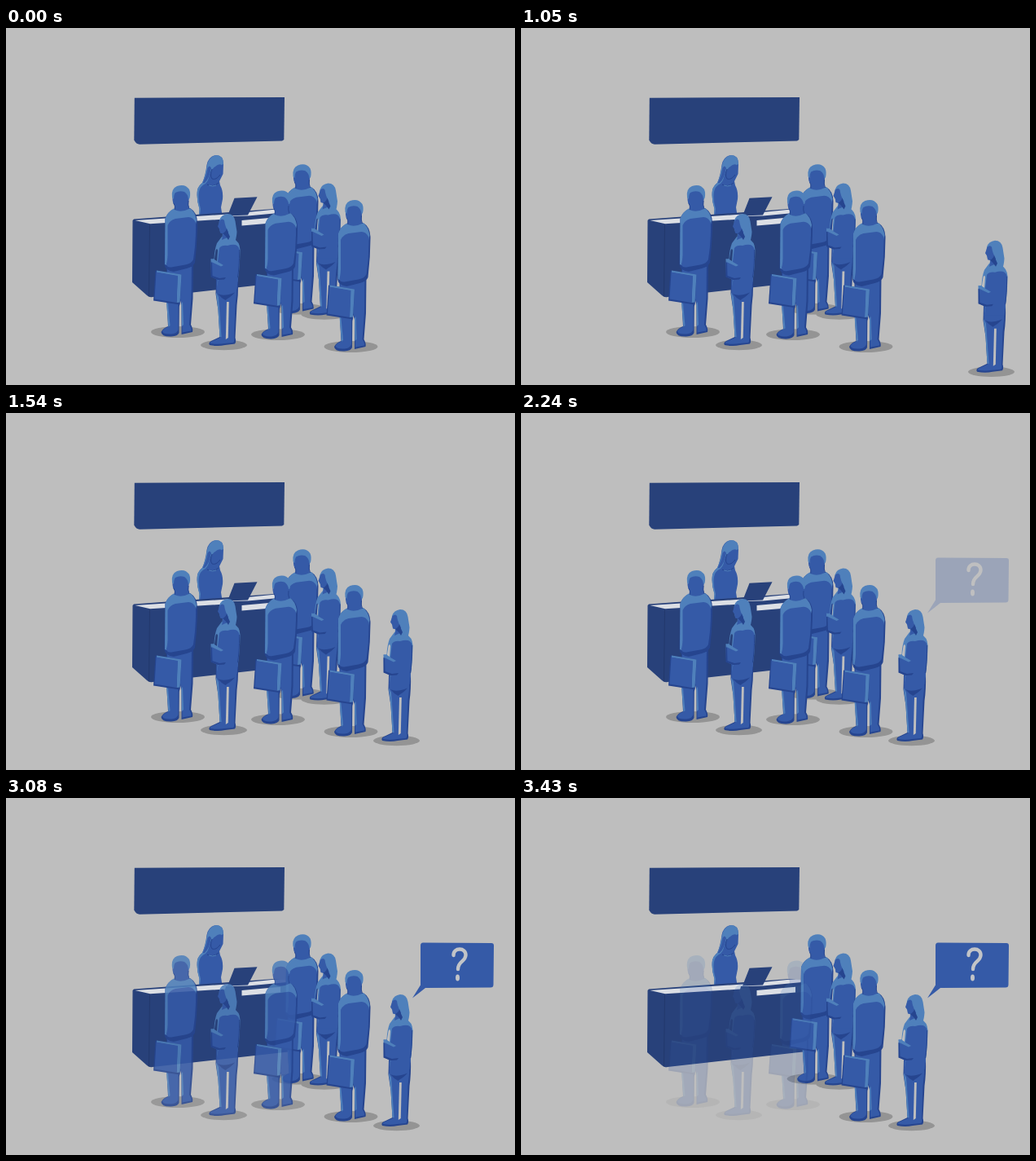
Animation, 625 px wide and 438 px high, one loop 6.72 s. Source, as an HTML page:

```html
<!DOCTYPE html>
<html lang="en">
<head>
<meta charset="utf-8">
<title>Queue at the counter</title>
<style>
  html, body { margin: 0; width: 100%; height: 100%; overflow: hidden; background: #bebebe; }
  svg { display: block; width: 100vw; height: 100vh; }
  .mid { fill: #355aa7; }
  .light { fill: #4f80bb; }
  .deep { fill: #26458f; }
  .navy { fill: #28417a; }
  .pale { fill: #dcdfe5; }
  .shade { fill: #949494; }
  .line { fill: none; stroke: #26458f; stroke-width: 1; }
</style>
</head>
<body>
<svg viewBox="0 0 625 438" preserveAspectRatio="none">
  <defs>
    <g id="man">
      <ellipse class="shade" cx="211" cy="373" rx="33" ry="7"/>
      <!-- legs and shoes -->
      <path class="deep" d="M197 288L230 287L229.500 332L227 364Q230 369 229 373L215.500 376L215.500 340L214 334L212.800 342L212.500 374Q211 378 203 378.500Q191 379 190.500 373Q193 368 199 366L197 330Z"/>
      <path class="mid" d="M198 288L228 287L227.500 330L225 364Q228 368 227.500 371.500L216.500 373.500L216 340L214 332L211.500 338L211.500 370Q210 375 203 375.500Q193 376 192 372Q194 368 201 366L198 330Z"/>
      <path class="light" d="M197 336L199 338L201.500 365L199.500 367ZM215.500 338L217 336L218 364L216 366Z"/>
      <!-- jacket -->
      <path class="deep" d="M195.500 234Q198 226 206 222L226 221Q234.800 226 235 239Q235 263 232 288Q230 293 222 295L206 299Q195.500 298 194.500 290Z"/>
      <path class="light" d="M195.500 234Q198 226 206 221.500L226 221Q232 225 234 236L231 250L200 292L195 290Z"/>
      <path class="mid" d="M198.500 242Q201 236 208 234L224 232Q230 232 233 239Q233.500 262 230 284Q228 289 220 290.500L203 293.500Q197 294 197 289Q198 287 198.500 278Z"/>
      <!-- head -->
      <path class="mid" d="M204.500 202Q207 195 215 194Q225 195 225.500 203L224.500 211Q223.500 215 224.500 222Q215 227 207 223L207 217Q204.500 215 204.500 211Z"/>
      <path class="light" d="M204 208Q202.500 197 210 194Q220 190.500 225 198Q227 203 225.500 209L224 210Q223.500 204 219 201Q213 199 208 202Q206 204 206 210Z"/>
      <path class="line" d="M206 215Q208 218 207.300 223M224 212Q223 217 225 222"/>
      <!-- briefcase -->
      <path class="deep" d="M183.500 297.500L215.500 302.500L213.500 339.500L181 334.500Z"/>
      <path class="light" d="M185 297.500L215.500 302.500L213.500 336.500L209.500 337L210.500 304.500L185 300Z"/>
      <path class="mid" d="M184.500 299.500L211 304L209.500 337L182.500 332.500Z"/>
    </g>

    <g id="woman">
      <ellipse class="shade" cx="267.500" cy="389" rx="28.500" ry="6.200"/>
      <!-- legs and shoes -->
      <path class="deep" d="M258 308L285 308Q285.500 326 283.500 340L281.500 380Q283 385 281 387.500L269 389Q260 391 250 389Q248 386 252 384L262.500 379L260.500 346L257.500 326Z"/>
      <path class="mid" d="M258.500 308L283.500 308Q284 324 281.500 340L280 380Q281 384 279 386L268 387Q260 388.500 251 387Q250 385 254 384L263 380L261 346L258.500 326Z"/>
      <path class="light" d="M257.800 324L261 330L264.500 379L262.500 379L260.500 346Z"/>
      <path class="deep" d="M260 326Q267 330 281 324.500Q276 330 272 332L269.500 334Q264 331 260 326Z"/>
      <path fill="#bebebe" class="gap" d="M271 336L273.800 336L272.800 380L269.800 382Z"/>
      <!-- body, open between arm and side -->
      <path class="light" fill-rule="evenodd" d="M265 256Q262 260 259 264Q256 272 255.500 283L251.500 284L252 305L260 309L259 318L283 318Q287 300 287.500 272Q287 262 279 258ZM257.500 273Q259 269 260 273L259 286L255.800 284Z"/>
      <path class="mid" d="M262 270Q265 266 272 267Q284 263 286.500 271Q287 293 283.500 320L258.500 320L260.500 309L252.500 305L252.500 286L260 287Z"/>
      <path class="light" d="M251.500 283L255 284L267 291L264 292.500L252.500 287Z"/>
      <path class="deep" d="M251.500 287L253 288L253.500 304L262 307L270 306L268 308.500L260 309L251.500 305.500Z"/>
      <path class="line" d="M286.700 272Q286.500 294 284.500 306"/>
      <!-- head, raised a little -->
      <path class="light" d="M262 236Q264 229 272 228Q280 228 281.500 237L283.500 250Q283 258 281 263L265 262L266 252L263 250Q261 244 262 236Z"/>
      <path class="mid" d="M262.500 236Q266 233 268 236Q269 244 273 250L272 257L265 260L266.500 252.500L263 251.500L262.300 247L260 243.500Z"/>
      <path class="deep" d="M266 252Q270 250 271 246Q273 252 275 256L273 260Q270 255 266 252Z"/>
    </g>
  </defs>

  <rect width="625" height="438" fill="#bebebe"/>
  <path class="navy" d="M157.800 85.700L342 85L341.300 137L339 138.500L164 142.700Q160 142.700 157.300 137.500Z"/>

  <g id="clerk">
    <path class="mid" d="M246.500 168Q249 157 258 156Q267 156 267 167L266.500 179L262 188L263 193Q267 200 266 210L264 220L266 233L237 233L237.500 222Q233.500 210 235 199Q236 194 241 190Q245 181 246.500 168Z"/>
    <path class="light" d="M246.500 170Q249 157 258 156Q267 156 267 167L265 168Q261 166 257 170Q252 173 250 180Q248 190 243 192Q238 195 237 201Q235.500 211 239 222L238 230L237 230L237.500 222Q233.500 210 235 199Q236 194 241 190Q245 182 246.500 170Z"/>
    <path class="mid" d="M247.500 172Q250 167 252 172Q250 184 244 190Q241 191 242 189Q246 182 247.500 172Z"/>
    <path class="line" d="M253 173Q250 181 253 185Q258 187 263 180M247 192Q254 196 261 190"/>
    <path d="M249 193Q254 195 258 193" fill="none" stroke="#4f80bb"/>
  </g>

  <g id="counter">
    <path class="navy" d="M157 234.500L329 222L346 224L346 311.500L180 330Q176 331 173 328L155 312L155.500 236Z"/>
    <path class="pale" d="M158.500 236L272 228.500L329 222.800L345 223L345 227L284 233.500L177 240.200Z"/>
    <path class="navy" d="M270 231L297 230.500L345 226V231L283 234.500L269 235Z"/>
    <path class="pale" d="M289.500 236L337 231.800V238.500L289.500 242.500Z"/>
    <path d="M176.500 241L175.500 329" fill="none" stroke="#22386c"/>
    <path class="navy" d="M280.500 208.700L308.500 207.300L297 229.500L272 230.500Z"/>
  </g>

  <use href="#man" transform="translate(148.500 -22.500) scale(1 .984)"/>
  <use href="#woman" transform="translate(123.500 -37.500)"/>
  <use href="#man" class="leaver"/>
  <use href="#woman" class="leaver"/>
  <use href="#man" class="leaver" transform="translate(123 10.500) scale(1 .98)"/>
  <use href="#man" transform="translate(212.500 18)"/>
  <use href="#woman" id="walker"/>

  <g id="bubble" opacity="0">
    <path class="mid" d="M512 177.500L596 178Q599 178 599 181L598.500 229Q598.500 232.500 595 232.500L515 233L499 245.500L509 229.500V181Q509 177.500 512 177.500Z"/>
    <path d="M549.500 193C549 183 565 183 564.500 193C564 201 555 200 555 210" fill="none" stroke="#c2c4c7" stroke-width="4.400" stroke-linecap="round"/>
    <ellipse cx="554.500" cy="220.500" rx="2.500" ry="4" fill="#c2c4c7"/>
  </g>
</svg>
<script>
  const LOOP = 6720, TICK = 70;
  const walker = document.getElementById('walker');
  const bubble = document.getElementById('bubble');
  const leavers = document.querySelectorAll('.leaver');

  // Ticks completed since `start`, counting the one at `start`, up to `max`.
  const ticks = (t, start, max) =>
    Math.max(0, Math.min(max, Math.floor((t - start) / TICK) + 1));

  function render(t) {
    const left = 13 - ticks(t, 700, 13);
    walker.setAttribute('transform', `translate(${212 + 14 * left} ${13 + 2.83 * left})`);
    bubble.setAttribute('opacity', ticks(t, 2240, 4) / 4);
    const fade = 1 - 0.8 * ticks(t, 3080, 6) / 6;
    leavers.forEach(p => p.setAttribute('opacity', fade));
  }

  const begin = performance.now();
  function frame() {
    render((performance.now() - begin) % LOOP);
    requestAnimationFrame(frame);
  }
  frame();
</script>
</body>
</html>
```
